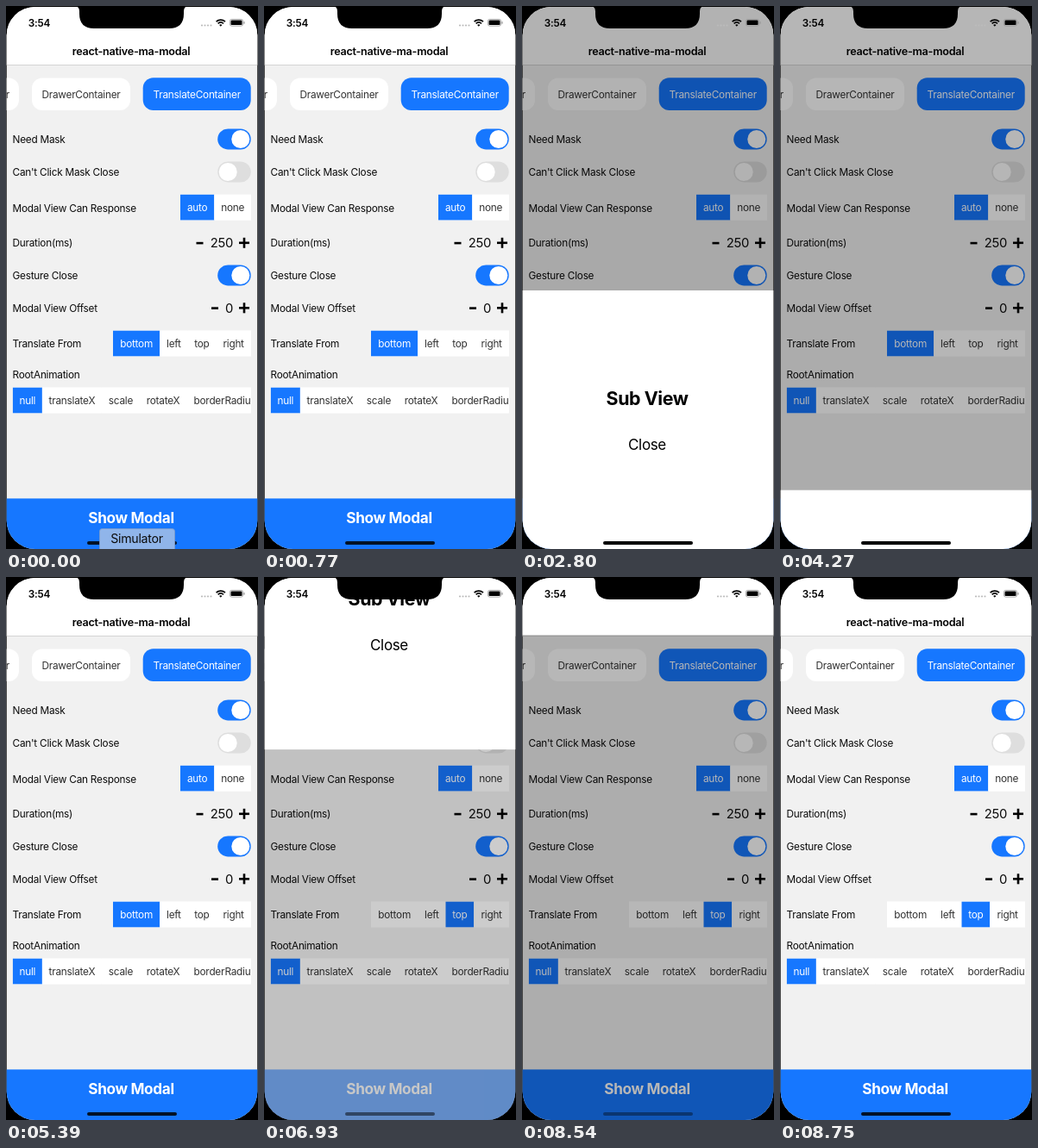
Recreate the animation shown at these times as an HTML page. Size 292 px wide and 630 px high, loop 9.73 s.

```html
<!DOCTYPE html>
<html lang="en">
<head>
<meta charset="utf-8">
<title>Modal demo</title>
<style>
  html, body { margin: 0; width: 100%; height: 100%; overflow: hidden; background: #000; }
  svg { display: block; width: 292px; height: 630px; }
  text { font-family: Inter, Roboto, sans-serif; letter-spacing: -.02em; }
</style>
</head>
<body>
<svg id="stage" viewBox="0 0 292 630"></svg>
<script>
const LOOP = 9730, STEP = 70, SHEET = 300, RELEASE_DRAG = 228;
const BLUE = '#1677ff', INK = '#0c0c0c', GREY = '#333';

const rect = (x, y, w, h, fill, rx = 0, extra = '') =>
  `<rect x="${x}" y="${y}" width="${w}" height="${h}" rx="${rx}" fill="${fill}" ${extra}/>`;

// Text placed by the vertical centre of its capitals.
const text = (x, cy, label, { size = 11.8, fill = INK, weight = 400, anchor = 'start' } = {}) =>
  `<text x="${x}" y="${cy + size * .364}" font-size="${size}" fill="${fill}"
    font-weight="${weight}" text-anchor="${anchor}">${label}</text>`;

const centred = (cy, label, size, weight, fill = '#000') =>
  text(145, cy, label, { size, weight, fill, anchor: 'middle' });

const toggle = (cy, on) =>
  rect(245.2, cy - 12, 38.5, 24, on ? BLUE : '#dedede', 12) +
  `<circle cx="${on ? 271.8 : 257.2}" cy="${cy}" r="10.5" fill="#fff"/>`;

const stepper = (cy, value, minusX) =>
  rect(minusX, cy - 1.2, 8, 2.6, '#000') +
  text(263, cy, value, { size: 14.8, anchor: 'end' }) +
  rect(270, cy - 1.5, 12, 2.6, '#000') + rect(274.7, cy - 6.2, 2.6, 12, '#000');

// cells: [label, left edge, width]; the first one is selected.
const options = (y, cells) => {
  const left = cells[0][1];
  return rect(left, y, 284 - left, 29.6, '#fff') + cells.map(([label, x, w], i) =>
    `<g id="${label}">` + rect(x, y, w, 29.6, i ? '#fff' : BLUE) +
    text(x + w / 2, y + 14.9, label, { fill: i ? GREY : '#fff', anchor: 'middle' }) + '</g>').join('');
};

const labels = [['Need Mask', 155], ["Can't Click Mask Close", 193], ['Modal View Can Response', 234.5],
  ['Duration(ms)', 275], ['Gesture Close', 313], ['Modal View Offset', 350.5],
  ['Translate From', 391.5], ['RootAnimation', 428]];

const page =
  rect(0, 0, 292, 630, '#f1f1f1') + rect(0, 0, 292, 68, '#fff') + rect(0, 68, 292, 1, '#d4d4d4') +
  centred(52.5, 'react-native-ma-modal', 12.6, 600) +
  rect(-30, 83.5, 45, 37.5, '#fff', 12) + text(4, 102.5, 'r', { fill: GREY, anchor: 'end' }) +
  rect(30, 83.5, 114, 37.5, '#fff', 12) + text(87, 102.5, 'DrawerContainer', { fill: GREY, anchor: 'middle' }) +
  rect(158.7, 83.3, 125, 37.8, BLUE, 12) + text(221.2, 102.5, 'TranslateContainer', { fill: '#fff', anchor: 'middle' }) +
  labels.map(([label, cy]) => text(7.5, cy, label)).join('') +
  toggle(154.5, true) + toggle(192.5, false) + toggle(312.5, true) +
  options(218.8, [['auto', 202, 39.3], ['none', 241.3, 42.7]]) +
  stepper(275, 250, 220.5) + stepper(350.5, 0, 238) +
  options(376.7, [['bottom', 124, 54.2], ['left', 178.2, 32.3], ['top', 210.5, 32.7], ['right', 243.2, 40.8]]) +
  '<g clip-path="url(#row)">' +
  options(442.7, [['null', 7.7, 34.2], ['translateX', 41.9, 69], ['scale', 111, 44], ['rotateX', 155, 54], ['borderRadius', 209, 89]]) +
  '</g>' +
  '<g id="button">' + rect(0, 571.4, 292, 59, BLUE) + centred(593.5, 'Show Modal', 17.2, 700, '#fff') + '</g>';

const statusBar =
  text(38.5, 19.5, '3:54', { size: 11.8, weight: 600, fill: '#000', anchor: 'middle' }) +
  [227, 230.5, 234, 237.5].map(x => `<circle cx="${x}" cy="22.5" r="1.1" fill="#bbb"/>`).join('') +
  `<path d="M243.6 18.2a7.6 7.6 0 0 1 10.4 0M245.6 20.4a4.8 4.8 0 0 1 6.4 0" fill="none" stroke="#000" stroke-width="1.7"/>
   <path d="M248.8 23.8l-1.7-1.9a2.6 2.6 0 0 1 3.4 0z"/>` +
  rect(259.4, 15.4, 15.2, 7.8, 'none', 2.2, 'stroke="#999" stroke-width=".8"') +
  rect(260.5, 16.5, 13, 5.6, '#000', 1.2) + rect(275.4, 18, 1.2, 2.8, '#999', .6);

stage.innerHTML =
  `<clipPath id="screen">${rect(.7, 1, 290.6, 629, '#000', 33)}</clipPath>
   <clipPath id="row">${rect(7.7, 442, 276.1, 31, '#000')}</clipPath>
   <g clip-path="url(#screen)">${page}
     ${rect(0, 0, 292, 630, '#000', 0, 'id="mask"')}
     <g id="sheet">${rect(0, 0, 292, SHEET, '#fff')}
       ${centred(125, 'Sub View', 21.4, 700)}${centred(179, 'Close', 17, 400)}</g>
     ${statusBar}
     ${rect(94, 621, 104, 4, '#000', 2, 'id="homeBar"')}
     <g id="tooltip">${rect(108.5, 606.5, 87, 27, '#90b5ea', 3, 'stroke="#7f9cc8" stroke-width=".8"')}
       ${text(151.5, 618, 'Simulator', { size: 14.2, anchor: 'middle' })}</g>
   </g>
   <path d="M79 0q6 0 6 6v3q0 17 17 17h87q17 0 17-17v-3q0-6 6-6z"/>`;

const $ = id => document.getElementById(id);
const clamp = x => Math.min(1, Math.max(0, x));
const ramp = (t, start, duration) => {
  const x = clamp((t - start) / duration);
  return x < .5 ? 2 * x * x : 1 - 2 * (1 - x) ** 2;
};
const touch = (t, press, release) => 1 - .8 * (ramp(t, press, 150) - ramp(t, release, 250));

const along = (t, points) => {
  const next = points.findIndex(p => p[0] > t);
  if (next <= 0) return points.at(next)[1];
  const [[t0, v0], [t1, v1]] = points.slice(next - 1, next + 1);
  return v0 + (v1 - v0) * (t - t0) / (t1 - t0);
};

const visits = [
  { press: 2080, release: 2464, open: 2455, drag: 3850, grab: 60, close: 4230 },
  { press: 6440, release: 6813, open: 6782, drag: 8050, grab: 87, close: 8495 }
];
const homeBarOpacity = [[0, .85], [2450, .85], [2520, .55], [2800, 1], [4480, 1], [4620, .85],
  [6780, .85], [6930, .5], [7210, .3], [8500, .3], [8750, .85]];

function select(id, on) {
  const [box, label] = $(id).children;
  box.setAttribute('fill', on ? BLUE : '#fff');
  label.setAttribute('fill', on ? '#fff' : GREY);
}

function draw(t) {
  const fromTop = t >= 5800;
  const v = visits[+fromTop];
  const opened = ramp(t, v.open, 250), left = 1 - ramp(t, v.close, 250);
  const dragged = t < v.drag ? 0
    : v.grab + (RELEASE_DRAG - v.grab) * clamp((t - v.drag) / (v.close - v.drag));
  const shown = (SHEET * opened - dragged) * left;

  $('sheet').setAttribute('transform', `translate(0 ${fromTop ? shown - SHEET : 630 - shown})`);
  $('mask').setAttribute('opacity', .3 * opened * left);
  $('button').setAttribute('opacity', touch(t, v.press, v.release));
  $('top').setAttribute('opacity', touch(t, 5580, 5790));
  $('tooltip').setAttribute('opacity', clamp(1 - t / 490));
  $('homeBar').setAttribute('opacity', along(t, homeBarOpacity));
  select('bottom', !fromTop);
  select('top', fromTop);
}

const began = performance.now();
function tick() {
  const t = (performance.now() - began) % LOOP;
  draw(Math.floor(t / STEP) * STEP);
  requestAnimationFrame(tick);
}
tick();
</script>
</body>
</html>
```
